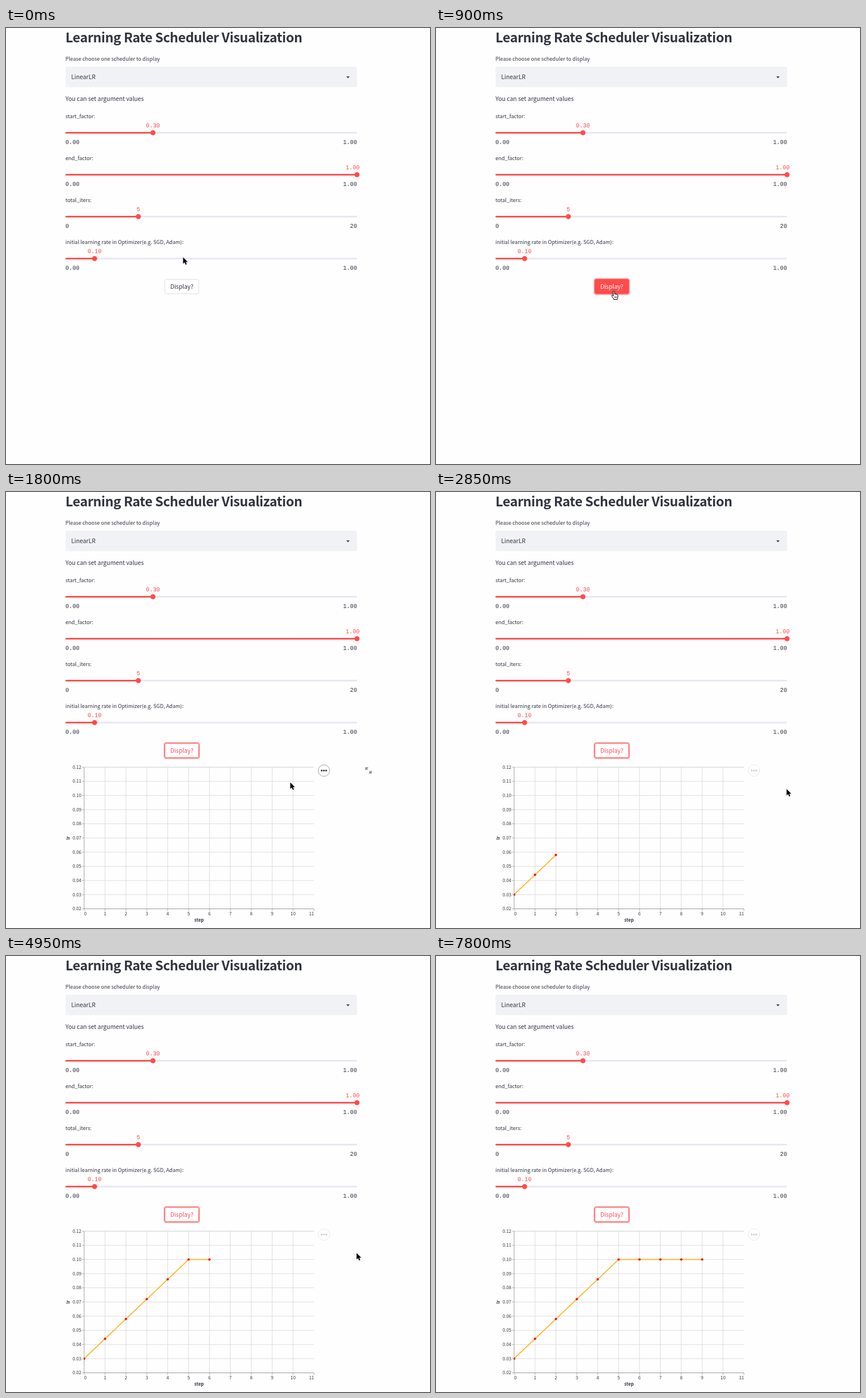
Animation, 738 px wide and 759 px high, one loop 8770 ms. Source, as an HTML page:

```html
<!DOCTYPE html>
<html lang="en">
<head>
<meta charset="utf-8">
<title>Learning Rate Scheduler Visualization</title>
<style>
html, body { margin: 0; width: 100%; height: 100%; overflow: hidden; background: #fefefe; }
svg { display: block; width: 738px; height: 759px; }
text { font-family: "Noto Sans CJK SC", "Noto Sans CJK JP", "Noto Sans CJK", "Noto Sans", sans-serif; fill: #31333f; white-space: pre; }
.title { font-size: 23px; font-weight: 700; letter-spacing: -.4px; }
.body { font-size: 10.33px; }
.label { font-size: 9.04px; }
.mono { font-family: "Liberation Mono", "DejaVu Sans Mono", monospace; font-size: 10.15px; }
.axis { font-size: 7.75px; }
.bold { font-size: 7.75px; font-weight: 700; }
.mid { text-anchor: middle; }
.end { text-anchor: end; }
</style>
</head>
<body>
<svg id="stage" viewBox="0 0 738 759" xmlns="http://www.w3.org/2000/svg"></svg>
<script>
const LOOP = 8770, NS = "http://www.w3.org/2000/svg";
const RED = "#ff4b4b", INK = "#31333f";
const LEFT = 103.5, WIDTH = 507.5, RIGHT = LEFT + WIDTH;
const stage = document.getElementById("stage");

function add(parent, tag, attrs = {}, content) {
  const el = document.createElementNS(NS, tag);
  for (const key in attrs) el.setAttribute(key, attrs[key]);
  if (content !== undefined) el.textContent = content;
  parent.appendChild(el);
  return el;
}
const text = (parent, x, y, cls, str, more) =>
  add(parent, "text", { x, y, class: cls, ...more }, str);
const line = (parent, x1, y1, x2, y2, stroke, width = 1) =>
  add(parent, "line", { x1, y1, x2, y2, stroke, "stroke-width": width });
const show = (el, on) => el.setAttribute("visibility", on ? "visible" : "hidden");

// Form
text(stage, LEFT, 25, "title", "Learning Rate Scheduler Visualization");
text(stage, LEFT, 57, "label", "Please choose one scheduler to display");
add(stage, "rect", { x: LEFT, y: 67.5, width: WIDTH, height: 35.5, rx: 3, fill: "#f0f2f6" });
text(stage, 113.5, 89.2, "body", "LinearLR");
add(stage, "path", { d: "M592.3 84.3h5.8l-2.9 3.2z", fill: INK });
text(stage, LEFT, 127.4, "body", "You can set argument values");

function slider(row, name, share, value, min, max) {
  const y = 182.3 + row * 73, x = LEFT + WIDTH * share;
  text(stage, LEFT, y - 25.2, "label", name);
  add(stage, "rect", { x: LEFT, y: y - 1.4, width: WIDTH, height: 2.9, rx: 1.4, fill: "#e5e7f0" });
  add(stage, "rect", { x: LEFT, y: y - 1.4, width: x - LEFT, height: 2.9, rx: 1.4, fill: RED });
  add(stage, "circle", { cx: x, cy: y, r: 4.4, fill: RED });
  text(stage, Math.min(x, 603.4), y - 8.9, "mono mid", value, { style: "fill:" + RED });
  text(stage, LEFT, y + 20, "mono", min);
  text(stage, RIGHT, y + 20, "mono end", max);
}
slider(0, "start_factor:", .3, "0.30", "0.00", "1.00");
slider(1, "end_factor:", 1, "1.00", "0.00", "1.00");
slider(2, "total_iters:", .25, "5", "0", "20");
slider(3, "initial learning rate in Optimizer(e.g. SGD, Adam):", .1, "0.10", "0.00", "1.00");

// Button
const ring = add(stage, "rect", { x: 275.4, y: 436.4, width: 61.2, height: 27.4, rx: 3.4,
  fill: "none", stroke: RED, "stroke-opacity": .5, "stroke-width": 2 });
const button = add(stage, "rect", { x: 276.5, y: 437.6, width: 59, height: 25, rx: 2.8 });
const caption = text(stage, 306, 453.8, "body mid", "Display?");

// Loading notice
const notice = add(stage, "g");
add(notice, "rect", { x: 103.5, y: 475.2, width: 508, height: 42.2, rx: 3, fill: "#e9f2fc", stroke: "#d9e8f3", "stroke-width": .8 });
text(notice, 116, 500.2, "body", "Loading...", { style: "fill:#1d5f6e" });

// Chart
const chart = add(stage, "g");
const X = step => 136 + step * 400 / 11;
const Y = lr => 725.6 - (lr - .02) * 2466;
const rate = step => .1 * (.3 + .7 * Math.min(step, 5) / 5);

for (let i = 1; i < 11; i++) line(chart, X(i), 479, X(i), 725.6, "#ddd");
for (let i = 0; i <= 10; i++) {
  const y = Y(.02 + i / 100);
  line(chart, 136, y, 536, y, i === 10 ? "#ccc" : "#ddd");
  line(chart, 132.4, y, 136, y, "#999", .8);
  text(chart, 131, y + 2.8, "axis end", (.02 + i / 100).toFixed(2));
}
for (let i = 0; i <= 11; i++) {
  line(chart, X(i), 725.6, X(i), 729.2, "#999", .8);
  const cls = i === 0 ? "axis" : i === 11 ? "axis end" : "axis mid";
  text(chart, X(i), 737.2, cls, i);
}
line(chart, 136, 479, 136, 725.6, "#999", .9);
line(chart, 136, 725.6, 536, 725.6, "#999", .9);
text(chart, 336, 748.3, "bold mid", "step");
text(chart, 0, 0, "bold mid", "lr", { transform: "translate(111.4 602.4) rotate(-90)" });

const clip = add(chart, "clipPath", { id: "plot" });
add(clip, "rect", { x: 135.5, y: 478, width: 401, height: 248 });
const plot = add(chart, "g", { "clip-path": "url(#plot)" });
const curve = add(plot, "polyline", { fill: "none", stroke: "#ffb42b", "stroke-width": 1.7 });
const dots = [...Array(10).keys()].map(i =>
  add(plot, "circle", { cx: X(i), cy: Y(rate(i)), r: 2.1, fill: "#f81208" }));

const menu = add(chart, "g");
add(menu, "circle", { cx: 553.4, cy: 485, r: 10, fill: "#fff", stroke: "#999", "stroke-width": .9 });
for (const dx of [-3.9, 0, 3.9]) add(menu, "circle", { cx: 553.4 + dx, cy: 485, r: 1.4, fill: "#111" });

const expand = add(chart, "g", { fill: "#85878f", stroke: "#85878f" });
for (const turn of [0, 180])
  add(expand, "path", { d: "M-4.9-4.9h3.6l-3.6 3.6zM-4-4l3 3", "stroke-width": 1.1,
    transform: `translate(630.9 484.6) rotate(${turn})` });

// Pointers, drawn from their tips
const arrow = add(stage, "path", { d: "M0 0V11L2.6 8.7 4.4 12.8 6.3 12 4.6 8H8z",
  fill: "#000", stroke: "#fff", "stroke-width": 1.3, "paint-order": "stroke", "stroke-linejoin": "round",
  style: "filter:drop-shadow(0 .7px .6px rgba(0,0,0,.3))" });
const hand = add(stage, "g", { stroke: "#000", "stroke-width": 1, "stroke-linejoin": "round" });
add(hand, "path", { fill: "#fff", d: "M-1.2 8.5V1.2Q-1.2 0 0 0T1.2 1.2V5.2Q2.4 4.4 3.4 5.6 4.6 4.9 5.4 6.1 7 5.7 7 7.4V10Q7 11.6 5.9 13V14.6H-.6V13.2Q-2.3 11.4-3.7 8.6-4.2 7.2-3 7-2.1 7-1.2 8.5z" });
add(hand, "path", { fill: "none", "stroke-width": .7, d: "M1.3 9.3V12M3 9.3V12M4.7 9.3V12" });

// Held poses: time, tip x, tip y, pointer
const poses = [
  [0, 308.3, 399.3, arrow], [150, 310, 408, arrow], [300, 315, 436, arrow], [450, 316.5, 459.5, arrow],
  [750, 309.6, 458, hand], [1200, 322, 463.5, arrow], [1350, 392, 497, arrow], [1500, 470, 514, arrow],
  [1650, 495.8, 506.2, arrow], [1800, 494.8, 505.7, arrow], [2100, 502, 506, arrow], [2250, 526, 510, arrow],
  [2400, 565, 514, arrow], [2550, 600, 517, arrow], [2700, 610.3, 517.3, arrow],
  [5850, 609.3, 516.5, arrow], [6000, 608.3, 515.7, arrow], [6300, 607.6, 515, arrow],
  [7350, 614, 532, arrow], [7500, 636, 610, arrow], [7650, 674.5, 707, arrow], [7800, 0, 0, null]
];
const pointTimes = [1950, 2250, 2700, 3300, 3900, 4350, 4950, 5400, 6000, 6600];
const fades = [[0, 1], [2550, .6], [2700, .2], [2850, 0], [5850, .5], [6000, 1], [7350, .5], [7500, 0]];
const latest = (list, t) => list.filter(k => k[0] <= t).pop();

function drawButton(t) {
  const hover = t >= 750, focus = t >= 900, pressed = focus && t < 1050;
  show(ring, focus);
  button.setAttribute("fill", pressed ? RED : "#fff");
  button.setAttribute("stroke", hover ? RED : "#d6d6d9");
  button.setAttribute("stroke-width", hover ? 1 : .8);
  caption.style.fill = pressed ? "#fff" : hover ? RED : INK;
}

function draw(t) {
  drawButton(t);
  show(notice, t >= 1200 && t < 1800);
  chart.style.display = t >= 1800 ? "" : "none";

  const count = pointTimes.filter(p => p <= t).length;
  dots.forEach((dot, i) => dot.setAttribute("opacity", i < count ? 1 : 0));
  curve.setAttribute("points", [...Array(count).keys()].map(i => X(i) + "," + Y(rate(i))).join(" "));
  menu.setAttribute("opacity", t < 2550 ? 1 : .22);
  expand.setAttribute("opacity", latest(fades, t)[1]);

  const [, x, y, pointer] = latest(poses, t);
  for (const p of [arrow, hand]) {
    show(p, p === pointer);
    p.setAttribute("transform", `translate(${x} ${y})`);
  }
}

const start = performance.now();
function tick() {
  draw((performance.now() - start) % LOOP);
  requestAnimationFrame(tick);
}
tick();
</script>
</body>
</html>
```
